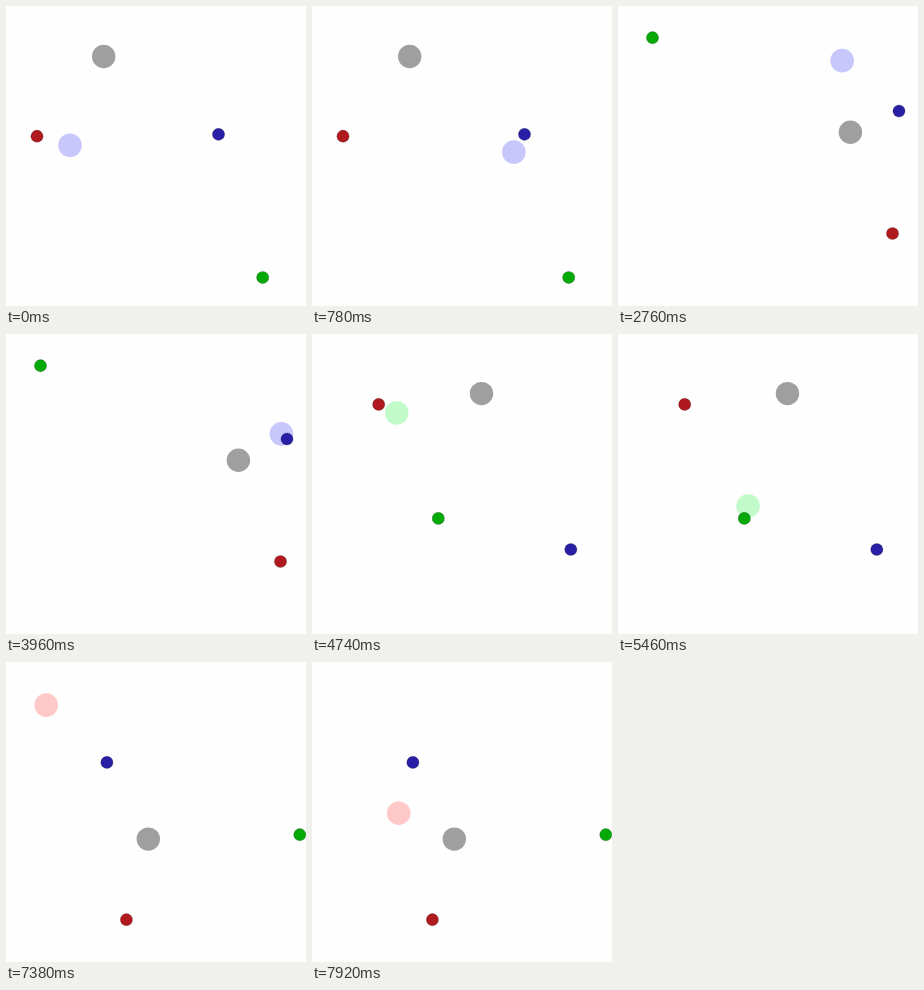
Animation of 300 by 300 pixels, one loop 8 s. Source, as an HTML page:

```html
<!DOCTYPE html>
<html lang="en">
<head>
<meta charset="utf-8">
<title>Particles seeking landmarks</title>
<style>
  html, body { margin: 0; height: 100%; overflow: hidden; background: #fefefe; }
  svg { display: block; width: 100%; height: 100%; }
  .landmark { r: 6.1px; stroke: #000; stroke-opacity: .25; stroke-width: .8px; }
</style>
</head>
<body>
<svg viewBox="0 0 300 300">
  <circle id="seeker" r="11.8"/>
  <circle id="speaker" r="11.7" fill="#9f9f9f"/>
  <circle id="red" class="landmark" fill="#b01a1e"/>
  <circle id="green" class="landmark" fill="#06aa08"/>
  <circle id="blue" class="landmark" fill="#281fa6"/>
</svg>
<script>
const LOOP = 8000, TICK = 60;
const tints = { red: '#ffc9c9', green: '#c1fbc9', blue: '#c8c7fb' };

// The seeker glides between two places; pace is its spring rate per second on x and y.
const episodes = [
  { start: 0, goal: 'blue', from: [64, 139.3], to: [226.6, 150.9], pace: [4.3, 2.5],
    speaker: [97.7, 50.5], red: [31, 130.2], green: [256.7, 271.5], blue: [212.5, 128.3] },
  { start: 2220, goal: 'blue', from: [133, 22], to: [276.5, 105.6], pace: [4, 2.5],
    speaker: [232.4, 126.2], red: [274.5, 227.5], green: [34.5, 31.7], blue: [281, 105] },
  { start: 4700, goal: 'green', from: [84.3, 76.7], to: [157.2, 180.2], pace: [2.8, 5.5],
    speaker: [169.5, 59.6], red: [66.7, 70.4], green: [126.3, 184.4], blue: [258.8, 215.5] },
  { start: 7180, goal: 'red', from: [32, 24], to: [145, 286.8], pace: [2.2, 2.2],
    speaker: [142.3, 177.1], red: [120.4, 257.7], green: [293.8, 172.7], blue: [100.9, 100.4] }
];

// Critically damped spring starting at rest.
function spring(from, to, pace, seconds) {
  const x = pace * seconds;
  return to + (from - to) * (1 + x) * Math.exp(-x);
}

function place(id, [x, y]) {
  const circle = document.getElementById(id);
  circle.setAttribute('cx', x);
  circle.setAttribute('cy', y);
}

function draw() {
  const now = performance.now() % LOOP;
  const time = Math.min(Math.floor(now / TICK) * TICK, 7920);
  const episode = episodes.findLast(e => e.start <= time);
  const { start, goal, from, to, pace } = episode;
  for (const id of ['speaker', 'red', 'green', 'blue']) place(id, episode[id]);
  place('seeker', [0, 1].map(axis =>
    spring(from[axis], to[axis], pace[axis], (time - start) / 1000)));
  document.getElementById('seeker').setAttribute('fill', tints[goal]);
  requestAnimationFrame(draw);
}
draw();
</script>
</body>
</html>
```
